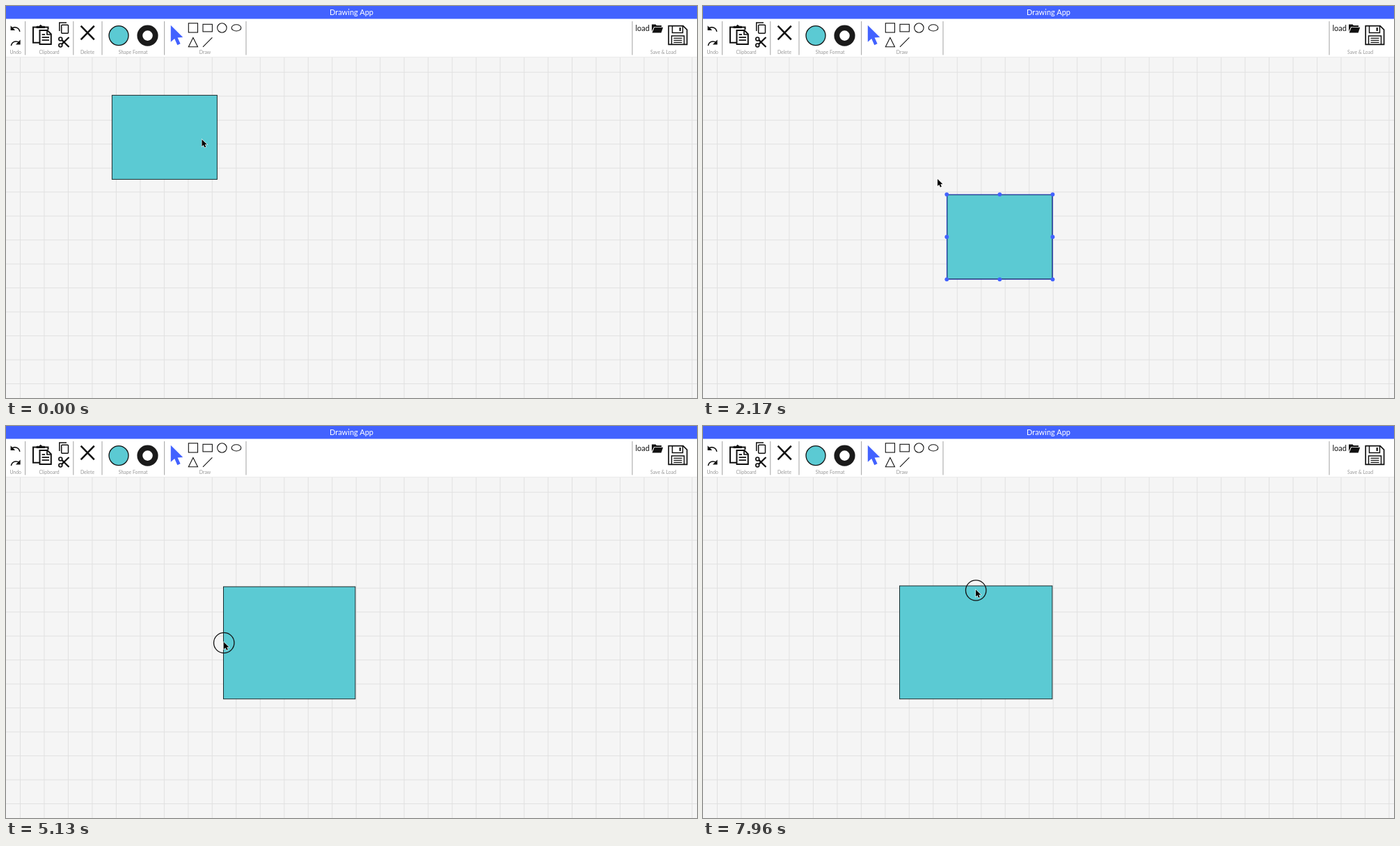
An HTML page for the animation above (8 s loop, 993 by 564 pixels).

```html
<!DOCTYPE html>
<html lang="en">
<head>
<meta charset="utf-8">
<title>Drawing App</title>
<style>
  html, body { margin: 0; width: 100%; height: 100%; overflow: hidden; background: #f5f5f5; }
  svg { display: block; width: 993px; height: 564px; }
  text { font-family: Lato, "Open Sans", sans-serif; text-anchor: middle; }
  .label { font-size: 6.9px; fill: #999; }
  .line { fill: none; stroke: #111; }
</style>
</head>
<body>
<svg viewBox="0 0 993 564">
  <rect width="993" height="564" fill="#f5f5f5"/>
  <g id="grid" stroke="#e1e1e1"></g>
  <rect y="18" width="993" height="55.5" fill="#fff"/>
  <path d="M0 73.5H993" stroke="#ebebeb"/>
  <rect width="993" height="18.5" fill="#4262ff"/>
  <text x="496.5" y="12.8" font-size="11" fill="#fff">Drawing App</text>
  <g id="bars" stroke="#aaa" stroke-width="1.1"></g>
  <g id="labels" class="label"></g>

  <!-- undo, redo -->
  <g id="undo">
    <path class="line" stroke-width="1.6" d="M8 32.2C12 29.4 18.5 30 19.8 36.8"/>
    <path d="M6.6 28.2V35H13.2Z" fill="#111"/>
  </g>
  <use href="#undo" transform="matrix(-1 0 0 1 27.2 20.4)"/>

  <!-- paste, copy, cut -->
  <g class="line" stroke-width="2">
    <path d="M48 52.8H39V30.6H60.5V34"/>
    <path d="M48.5 35H59.5L64.8 40.3V55H48.5Z" fill="#fff"/>
    <path d="M59 35V41H64.8M51.6 41.2H56M51.6 45.2H62M51.6 49.2H62" stroke-width="1.7"/>
    <path d="M44 31.5V29.3H47.5L49.7 27.3L52 29.3H55.5V31.5Z" fill="#111" stroke-width="1"/>
    <path d="M76.8 36V24.1H87" stroke-width="1.5"/>
    <rect x="79.7" y="27.2" width="9.8" height="12" rx="1" stroke-width="1.5"/>
    <circle cx="78.3" cy="47.4" r="2.4" stroke-width="1.7"/>
    <circle cx="78.3" cy="56.4" r="2.4" stroke-width="1.7"/>
    <path d="M80.2 48.9L90.5 59M80.2 54.9L90.5 45" stroke-width="2.2"/>
  </g>

  <!-- delete -->
  <path class="line" stroke-width="2.6" d="M107.6 28.6L126.8 48.4M126.8 28.6L107.6 48.4"/>

  <!-- fill and outline format -->
  <circle cx="162" cy="42.6" r="14" fill="#5bcad3" stroke="#111" stroke-width="1.3"/>
  <circle cx="203.5" cy="42.6" r="11.2" fill="#fff" stroke="#1a1a1a" stroke-width="7.8"/>

  <!-- draw tools -->
  <path d="M236.8 27.8V51.8L242.2 47L246.3 56.2L250.6 54.3L246.6 45.4L254.2 45Z" fill="#4262ff"/>
  <g class="line" stroke-width="1.1">
    <rect x="262.3" y="24.8" width="13.2" height="13.2"/>
    <rect x="283" y="26.3" width="13.4" height="10.6"/>
    <circle cx="310.4" cy="31.5" r="6.7"/>
    <ellipse cx="331" cy="31.4" rx="6.8" ry="4.6"/>
    <path d="M268.9 45.6L275.5 58.8H262.3ZM283 58.8L296.4 45.4"/>
  </g>

  <!-- load and save -->
  <text x="914.7" y="36" font-size="11" fill="#111">load</text>
  <path d="M928 36.5V26.6H933.5L935 28H942V30H931.2Z" fill="#111"/>
  <path d="M931.8 30.8H944.2L941.6 38.4H928.6Z" fill="#111"/>
  <g class="line" stroke-width="1.7">
    <path d="M952.2 28.6H973L978.6 34.2V55.4H952.2Z"/>
    <path d="M957.5 28.6V38.5H972.5V28.6M956.5 55.4V43H974.5V55.4" stroke-width="1.5"/>
    <path d="M968.7 31V36" stroke-width="2.2"/>
    <path d="M959.5 46.4H971.5M959.5 49.4H971.5M959.5 52.4H971.5" stroke-width="1.2"/>
  </g>

  <rect id="shape" fill="#5bcad3" stroke="#1c2b2d"/>
  <g id="sel">
    <rect id="frame" fill="none" stroke="#2a45c8"/>
  </g>
  <circle id="ring" r="14.7" fill="none" stroke="#111" stroke-width="1.3"/>
  <path id="cursor" d="M0 0V10L2.3 7.9L4 11.6L5.8 10.8L4.2 7.2H7.4Z" fill="#000"
        stroke="#fff" stroke-width="1.1" paint-order="stroke"/>
</svg>
<script>
const LOOP = 8000, LAG = 14, STEP = 34.48;
const $ = id => document.getElementById(id);

function set(el, attrs) {
  for (const k in attrs) el.setAttribute(k, attrs[k]);
}
function add(parent, tag, attrs, text) {
  const el = document.createElementNS("http://www.w3.org/2000/svg", tag);
  set(el, attrs);
  if (text) el.textContent = text;
  return parent.appendChild(el);
}

for (let x = 20.5; x < 993; x += STEP) add($("grid"), "path", { d: `M${x} 73V564` });
for (let y = 95.3; y < 564; y += STEP) add($("grid"), "path", { d: `M0 ${y}H993` });
for (const x of [27.6, 96.8, 138, 227.6, 345, 900]) add($("bars"), "path", { d: `M${x} 22V70.5` });
const labels = { Undo: 13.7, Clipboard: 62, Delete: 117, "Shape Format": 182.7, Draw: 286, "Save & Load": 944.5 };
for (const name in labels) add($("labels"), "text", { x: labels[name], y: 69.4 }, name);

// Pointer moves: start, end, x, y; it rests in between
const home = [281.5, 192];
const moves = [
  [40, 330, 252.5, 195],
  [540, 670, 382, 305], [670, 750, 437.5, 328], [750, 880, 451, 338.3],
  [1090, 1130, 446, 332],
  [1590, 2090, 340, 251], [2090, 2170, 337, 249], [2170, 2500, 351, 269],
  [2920, 3210, 278.5, 228.5],
  [3380, 3830, 285.5, 318], [3830, 4170, 272.5, 316], [4170, 4250, 278.4, 311],
  [4460, 4750, 305, 311], [4920, 5130, 313, 311], [5130, 5260, 318, 311],
  [5300, 5680, 240.5, 310.5], [5900, 6130, 282.5, 310.5],
  [6210, 6540, 402, 217], [6540, 7380, 392.5, 228], [7380, 7460, 391.3, 228.5],
  [7670, 7790, 391.3, 227.3], [7940, 7960, 392, 235.5]
];

// Each press drags some edges of the box
const drags = [
  { from: 500, to: 920, edges: "ltrb" },
  { from: 2750, to: 3380, edges: "lt" },
  { from: 4420, to: 6210, edges: "l" },
  { from: 7630, to: LOOP, edges: "t", still: 7900 }
];

function pointer(t) {
  let [x, y] = home;
  for (const [a, b, nx, ny] of moves) {
    if (t <= a) break;
    const p = Math.min(1, (t - a) / (b - a));
    x += (nx - x) * p;
    y += (ny - y) * p;
  }
  return [x, y];
}

function box(t) {
  const e = { l: 152.4, t: 128.4, r: 303.4, b: 249.4 };
  for (const d of drags) {
    if (t < d.from) break;
    const [x0, y0] = pointer(d.from);
    const [x, y] = pointer(Math.min(t - LAG, d.still || d.to));
    for (const k of d.edges) e[k] += "lr".includes(k) ? x - x0 : y - y0;
  }
  return e;
}

const spots = [];
for (const u of [0, .5, 1])
  for (const v of [0, .5, 1])
    if (u !== .5 || v !== .5)
      spots.push({ u, v, el: add($("sel"), "circle", { r: 2.9, fill: "#4262ff" }) });

const show = (el, on) => el.setAttribute("visibility", on ? "visible" : "hidden");

function draw(t) {
  const e = box(t), w = e.r - e.l, h = e.b - e.t;
  const held = drags.some(d => t >= d.from && t < d.to);
  set($("shape"), { x: e.l, y: e.t, width: w, height: h });
  set($("frame"), { x: e.l - .5, y: e.t - .5, width: w + 1, height: h + 1 });
  for (const s of spots)
    set(s.el, { cx: e.l - .6 + s.u * (w + 1.2), cy: e.t - .6 + s.v * (h + 1.2) });
  show($("sel"), t >= 500 && (!held || t < 580));

  const [x, y] = pointer(t);
  set($("cursor"), { transform: `translate(${x} ${y})` });
  set($("ring"), { cx: x + .2, cy: y + 1 });
  show($("ring"), held);
}

const start = performance.now();
function tick() {
  draw((performance.now() - start) % LOOP);
  requestAnimationFrame(tick);
}
tick();
</script>
</body>
</html>
```
